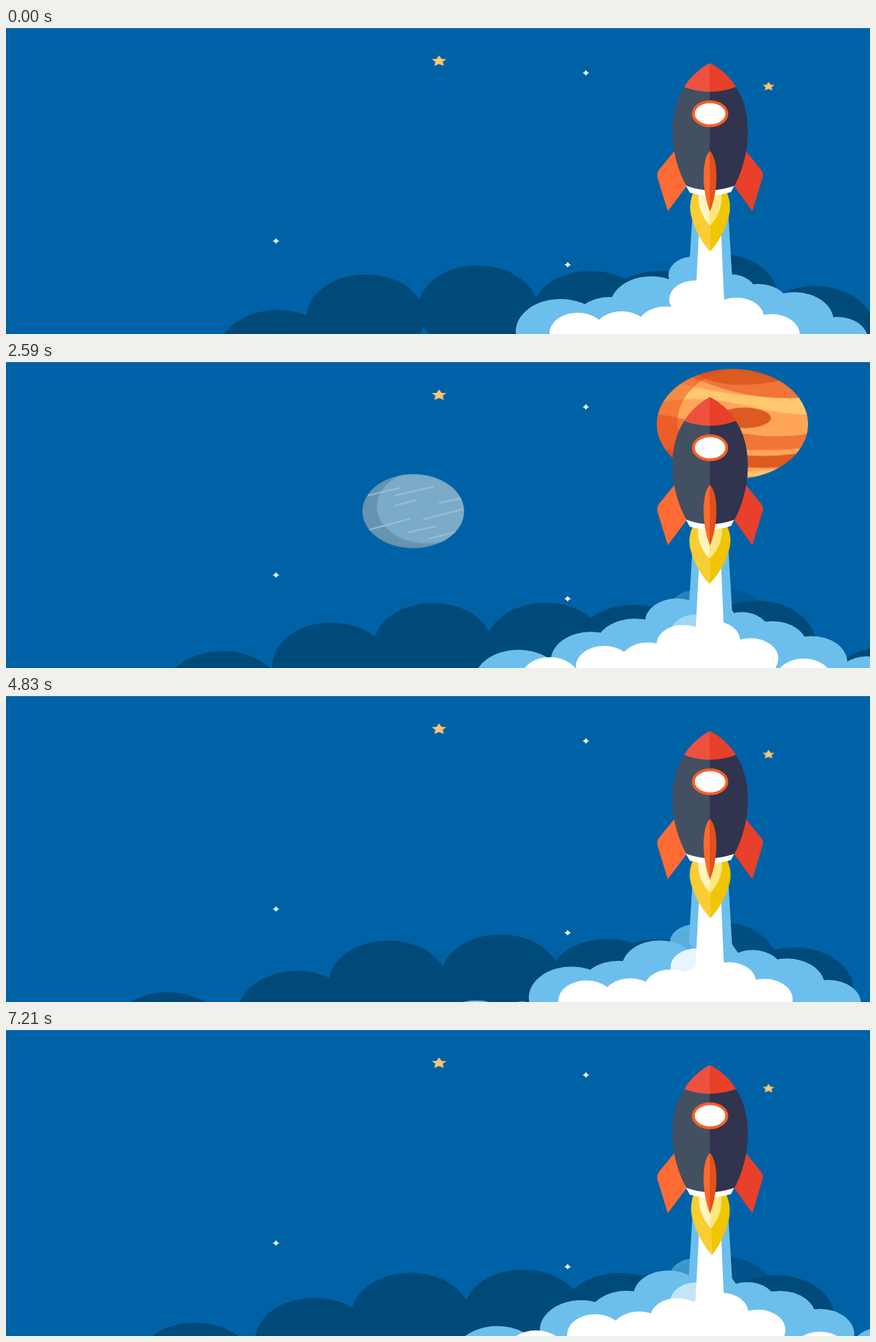
An HTML page without scripts for the animation above (7.28 s loop, 1256 by 446 pixels).

```html
<!DOCTYPE html>
<html lang="en">
<head>
<meta charset="utf-8">
<title>Rocket launch</title>
<style>
/* --f counts 70 ms ticks, --p is the tick within a five-tick cloud cycle */
@property --f { syntax: "<integer>"; inherits: true; initial-value: 0; }
@property --q { syntax: "<integer>"; inherits: true; initial-value: 0; }
@property --p { syntax: "<integer>"; inherits: true; initial-value: 0; }

html, body { margin: 0; width: 100%; height: 100%; overflow: hidden; background: #0062a6; }
svg {
  display: block;
  width: 1256px;
  height: 446px;
  --q: calc(var(--f) / 5 - .4);
  --p: calc(var(--f) - 5 * var(--q));
}
svg, .move { animation: 7.28s linear -2ms infinite; }
svg { animation-name: tick; animation-timing-function: steps(104); }
@keyframes tick { from { --f: 0; } to { --f: 104; } }

/* Cloud puff: x, top y, radius r, and their change u, v, w over one cycle */
.puffs ellipse {
  --k: calc(var(--p) / 5);
  --rx: calc((var(--r) + var(--w, 0) * var(--k)) * 1px);
  rx: var(--rx);
  ry: calc(var(--rx) * .73);
  cx: calc((var(--x) + var(--u, 0) * var(--k)) * 1px);
  cy: calc((var(--y) + var(--v, 0) * var(--k)) * 1px + var(--rx) * .73);
}
.puffs .new { opacity: calc((var(--p) - .5) * .24); }
.puffs .once { opacity: calc(var(--p) * (2 - var(--p))); }
.dark { fill: #004a7a; }
.light { fill: #6cbfec; }
.white { fill: #fff; }

.giant { animation-name: giant; }
@keyframes giant {
  0%       { transform: translate(1262px, -122px); animation-timing-function: steps(13); }
  12.5%    { transform: translate(1187px, -68.5px); animation-timing-function: steps(8); }
  20.1923% { transform: translate(1138px, -31px); animation-timing-function: steps(8); }
  27.8846% { transform: translate(1094px, 20px); animation-timing-function: steps(4); }
  31.7308% { transform: translate(1073px, 53.5px); animation-timing-function: steps(4); }
  35.5769% { transform: translate(1056px, 90.5px); animation-timing-function: steps(9); }
  44.2308% { transform: translate(1037px, 184px); animation-timing-function: steps(10); }
  53.8462% { transform: translate(1032px, 297px); animation-timing-function: steps(21); }
  74.0385%, 100% { transform: translate(1032px, 550px); }
}
.moon { animation-name: moon; }
@keyframes moon {
  0%       { transform: translate(230px, -115px); animation-timing-function: steps(13); }
  12.5%    { transform: translate(402px, -54px); animation-timing-function: steps(8); }
  20.1923% { transform: translate(500px, -3px); animation-timing-function: steps(8); }
  27.8846% { transform: translate(568px, 84.5px); animation-timing-function: steps(4); }
  31.7308% { transform: translate(583px, 148px); animation-timing-function: steps(4); }
  35.5769% { transform: translate(592px, 217.5px); animation-timing-function: steps(19); }
  53.8462%, 100% { transform: translate(598px, 560px); }
}

.flame { transform-origin: 1023px 243px; animation-name: flame; }
@keyframes flame {
  0%       { transform: none; }
  12.5%    { transform: skewX(.7deg); }
  27.8846% { transform: scale(1.02, .98); }
  35.5769% { transform: skewX(-.7deg) scale(1.03, .97); }
  53.8462% { transform: skewX(1.3deg) scale(1.03, .97); }
  78.8462% { transform: skewX(-.5deg) scale(1.02, .975); }
  99.0385% { transform: skewX(1.8deg) scale(.97, 1.025); }
  100%     { transform: none; }
}

.a { animation-name: blink-a; }
.b { animation-name: blink-b; }
.c { animation-name: blink-c; }
.d { animation-name: blink-d; }
@keyframes blink-a {
  0%, 25%, 30.8%, 54%, 59.2%, 82.5%, 88%, 100% { opacity: 1; }
  27.9%, 56.6%, 85.2% { opacity: .75; }
}
@keyframes blink-b {
  0%, 9.6%, 15.4%, 38.2%, 44%, 66.8%, 72.6%, 100% { opacity: 1; }
  12.5%, 41.1%, 69.7% { opacity: .6; }
}
@keyframes blink-c {
  0%, 44%, 50%, 66.5%, 72.5%, 96.2%, 99%, 100% { opacity: 1; }
  47%, 69.5%, 97.5% { opacity: .7; }
}
@keyframes blink-d {
  0%, 25%, 31%, 61%, 67%, 100% { opacity: 1; }
  28%, 64% { opacity: .8; }
}
</style>
</head>
<body>
<svg viewBox="0 0 1256 446">
  <defs>
    <clipPath id="disc"><ellipse rx="110" ry="80.5"/></clipPath>
    <clipPath id="moonDisc"><ellipse rx="74" ry="54"/></clipPath>
    <path id="star" d="M0-8 2.6-2.9 7.8-2.5 3.9 1.1 4.9 7.3 0 4.5-4.9 7.3-3.9 1.1-7.8-2.5-2.6-2.9Z" fill="#fcc66f"/>
    <path id="spark" d="M-5 0Q-1.5-1 0-4 1.5-1 5 0 1.5 1 0 4-1.5 1-5 0Z" fill="#fff"/>
  </defs>

  <rect width="1256" height="446" fill="#0062a6"/>
  <rect width="1256" height="1" fill="#2a78b4"/>

  <g transform="translate(1108.5 85) scale(1.12 .82)"><use href="#star" class="move b"/></g>
  <g transform="translate(843 65.5)"><use href="#spark" class="move c"/></g>
  <g transform="translate(392.5 310.5)"><use href="#spark" class="move d"/></g>
  <g transform="translate(816.5 345)"><use href="#spark"/></g>

  <g class="move moon">
    <g clip-path="url(#moonDisc)">
      <ellipse rx="74" ry="54" fill="#6593b0"/>
      <ellipse cx="21" cy="-7" rx="74" ry="54" fill="#7babc7"/>
      <path d="M-65-23-20-34M-26-23 30-36M-27-8 3-16M38-12 74-20M-64 27-5 11M15 12 72-3M-8 31 32 22M22 40 68 29" stroke="#98c3d9" stroke-width="1.9" stroke-linecap="round"/>
    </g>
  </g>
  <g transform="translate(629.5 48) scale(1.38 1)"><use href="#star" class="move a"/></g>

  <g class="move giant">
    <g clip-path="url(#disc)">
      <rect x="-110" y="-81" width="220" height="162" fill="#ffa559"/>
      <path d="M-110-64C-60-60-20-36 110-40V-14C50-14 10-34-40-36-70-38-90-34-110-30Z" fill="#ffc76e"/>
      <path d="M-60-81V-68C-30-58 20-32 110-39V-81Z" fill="#f0753a"/>
      <path d="M-56-81C-40-52 30-54 70-64V-81Z" fill="#dd5a20"/>
      <path d="M-110-14C-50-10 10 30 110 14V34C40 44-30 30-110 40Z" fill="#f0753a"/>
      <path d="M-110 38C-40 32 20 58 110 40V58C40 72-30 56-110 58Z" fill="#dd5a20"/>
      <path d="M-60 81C-20 62 30 76 85 62V81Z" fill="#ffc76e"/>
      <ellipse cx="17" cy="-9" rx="39" ry="15" fill="#dd5a20"/>
      <path d="M-110-81H110V81H-110ZM-80-4A110 80.5 0 0 0 140-4 110 80.5 0 0 0-80-4Z" fill="#e84010" fill-rule="evenodd" opacity=".45"/>
    </g>
  </g>

  <g class="puffs dark">
    <rect x="630" y="420" width="370" height="26"/>
    <ellipse class="new" style="--x:1036;--y:329;--r:86"/>
    <ellipse class="new" style="--x:950;--y:354;--r:86"/>
    <ellipse style="--x:950;--y:354;--r:87;--u:-95"/>
    <ellipse style="--x:850;--y:354;--r:87;--u:-164;--v:-8"/>
    <ellipse style="--x:686;--y:346;--r:87;--u:-163;--v:13"/>
    <ellipse style="--x:523;--y:359;--r:86;--u:-125;--v:52"/>
    <ellipse style="--x:395;--y:411;--r:87;--u:-200;--v:26"/>
    <ellipse style="--x:1036;--y:329;--r:86;--u:138;--v:47"/>
    <ellipse style="--x:1176;--y:376;--r:86;--u:254;--v:100"/>
  </g>

  <g class="puffs light">
    <path d="M1000 365 930 405 830 430 800 446H1190L1150 425 1100 400 1066 377 1050 365Z"/>
    <ellipse class="new" style="--x:1001;--y:333;--r:36"/>
    <ellipse style="--x:1000;--y:333;--r:37;--u:-62;--v:29;--w:23"/>
    <ellipse style="--x:938;--y:362;--r:60;--u:-60;--v:30;--w:-6"/>
    <ellipse style="--x:878;--y:392;--r:54;--u:-70;--v:3;--w:10"/>
    <ellipse style="--x:806;--y:395;--r:65;--u:-153;--v:61"/>
    <ellipse style="--x:1054;--y:359;--r:36;--u:39;--v:14;--w:10"/>
    <ellipse style="--x:1093;--y:373;--r:46;--u:53;--v:12;--w:11"/>
    <ellipse style="--x:1146;--y:385;--r:57;--u:62;--v:36;--w:-12"/>
    <ellipse style="--x:1208;--y:421;--r:45;--u:110;--v:20"/>
    <path d="M998 270 992.5 360 1030 400 1066 377 1055.5 362 1050 270Z"/>
  </g>

  <g class="puffs white">
    <path d="M1000 395 950 425 850 440 845 446H1120L1105 435 1050 410 1040 395Z"/>
    <ellipse class="new" style="--x:1003;--y:368;--r:37"/>
    <ellipse class="once" style="--x:851;--y:412;--r:40"/>
    <ellipse style="--x:1002;--y:368;--r:38;--u:-44;--v:38;--w:2"/>
    <ellipse style="--x:958;--y:406;--r:40;--u:-63;--v:7;--w:1"/>
    <ellipse style="--x:895;--y:413;--r:41;--u:-64;--v:2"/>
    <ellipse style="--x:831;--y:415;--r:41;--u:-101;--v:38;--w:3"/>
    <ellipse style="--x:1008;--y:368;--r:36;--u:54;--v:25;--w:4"/>
    <ellipse style="--x:1062;--y:393;--r:40;--u:51;--v:24;--w:1"/>
    <ellipse style="--x:1113;--y:417;--r:41;--u:117;--v:38"/>
    <path d="M1008 285 1002 400H1044L1039 285Z"/>
  </g>

  <g class="move flame">
    <path d="M1024 240H999C994 252 993 264 997 277 1002 295 1011 312 1023.5 326Z" fill="#f9cd33"/>
    <path d="M1023.5 240H1048C1053 252 1054 264 1050 277 1045 295 1036 312 1023.5 326Z" fill="#efc600"/>
    <path d="M1024 240H1007C1005 258 1011 275 1023.5 288Z" fill="#fff5bf"/>
    <path d="M1023.5 240H1040C1042 258 1036 275 1023.5 288Z" fill="#fce67e"/>
  </g>

  <path d="M971 180 949 207Q945 213 948 221L962 267 989 231 995 200Z" fill="#ff6b35"/>
  <path d="M1076 180 1098 207Q1102 213 1099 220L1085 267 1059 231 1052 200Z" fill="#e8402a"/>
  <path d="M988 229H1059L1054 239Q1023 249 994 240Z" fill="#fff"/>
  <path d="M986 86C960 125 965 187 989 230Q1006 236 1023.5 236.5V86Z" fill="#435062"/>
  <path d="M1061 86C1087 125 1082 187 1059 230Q1041 236 1023 236.5V86Z" fill="#30344e"/>
  <path d="M1023.5 51C1009 58 993 73 986 86Q1004 93 1023.5 93Z" fill="#ee5140"/>
  <path d="M1023 51C1038 58 1054 73 1061 86Q1042 93 1023 93Z" fill="#e8402a"/>
  <ellipse cx="1023.5" cy="125" rx="24.3" ry="17.5" fill="#fff" stroke="#fb5d26" stroke-width="4.2"/>
  <path d="M1023.5 179C1011 190 1011 238 1023.5 268Z" fill="#ff6a2c"/>
  <path d="M1023 179C1036 190 1036 238 1023 268Z" fill="#e4501c"/>
</svg>
</body>
</html>
```
